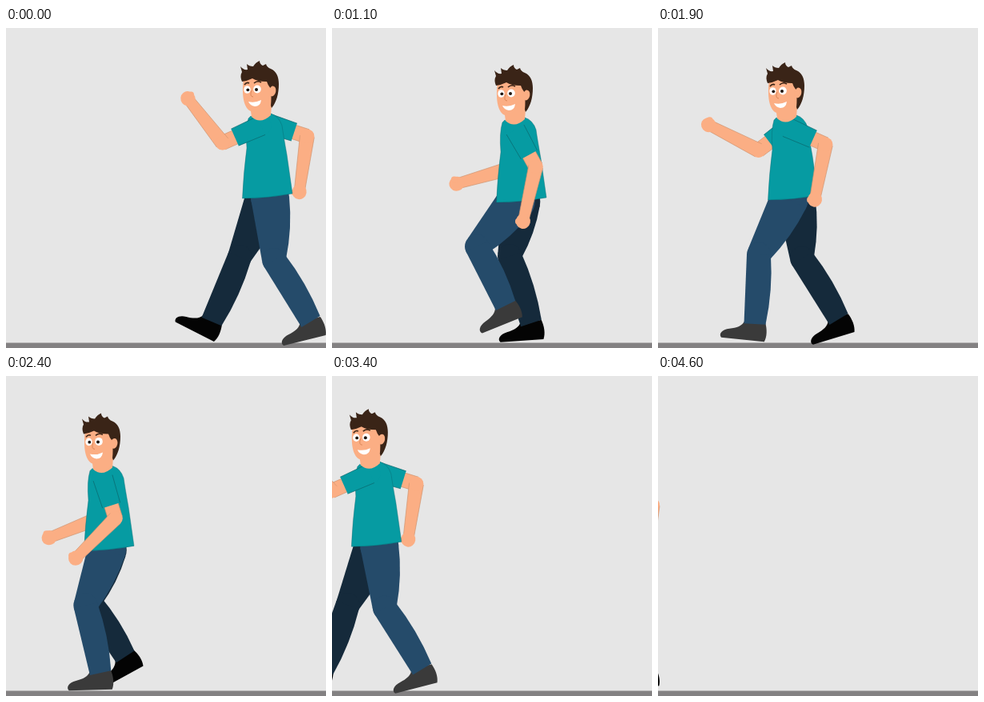
These frames come from a looping animation (400x400 px, 4.7 s). An HTML page with a canvas:

```html
<!DOCTYPE html>
<html lang="en">
<head>
<meta charset="utf-8">
<title>Walking man</title>
<style>
  html, body { margin: 0; width: 100%; height: 100%; overflow: hidden; background: #e6e6e6; }
  canvas { display: block; width: 400px; height: 400px; }
</style>
</head>
<body>
<canvas id="stage" width="400" height="400"></canvas>
<script>
const ctx = document.getElementById('stage').getContext('2d');

const LOOP = 4700, TICK = 100;
const CYCLE = 3330, STEP = CYCLE / 2, STEP_LENGTH = 132;
const UPPER = 53, FORE = 70, SLEEVE = 36;

const SKIN = '#fbae84', SKIN_EDGE = '#cf9470', HAIR = '#3a2417';
const SHIRT = '#069ba2', SEAM = '#0b666c';
const NEAR = { pants: '#254b6a', shoe: '#3a3a3a', shoulder: [319, 122] };
const FAR = { pants: '#152a3b', shoe: '#040404', shoulder: [326, 119] };

// time, x, y of the body, one step
const BODY = [
  [0, 0, 0], [235, -26, 2], [485, -48.5, 5], [1100, -90, 5], [1235, -98.5, 4]
];

// time, upper arm, forearm, knee x, y (in the body), ankle x, y (on the stage), shoe turn
const LIMBS = [
  [0, 66, 142, 335, 290, 381, 367, -14],
  [235, 53, 117, 338, 286, 358, 364, -17],
  [500, 33, 102, 323, 282, 321, 355, -29],
  [1100, -29, 13, 271, 268, 217, 347, -22],
  [1235, -45, 6, 275, 263, 194, 351, -7],
  [1665, -72, 8, 292, 286, 125, 367, 27],
  [1900, -66, 11, 284, 281, 121, 370, 6],
  [2165, -39, 28, 289, 282, 119, 372, 0],
  [2765, 14, 74, 312, 280, 117, 369, -4],
  [2900, 18, 94, 319, 283, 116, 369, -9]
];

const SHOE = new Path2D('M-13-3L13-3C16 5 17 14 14 21L-40 21C-44 17-40 11-31 9C-22 7-15 4-13-3Z');
const TORSO = new Path2D('M306 110Q319 122 331 107Q341 110 345 122Q347 136 351 158L358 207' +
  'Q327 213 295.5 213Q297 180 301 150Q299 126 303 113Z');
const FACE = new Path2D('M297 62C295 78 295 99 306 104L307 111Q318 121 331 109L332 97L339 78L336 62Z');
const HAIR_SHAPE = new Path2D('M295 67Q292 60 295 55L293 48Q297 53 302 52L301 45Q304 48 309 48' +
  'Q312 43 317 41Q317 45 321 47L325 45Q326 49 331 51C338 54 341 61 341 70' +
  'C341 82 338 93 332 100L331 97Q332 88 331 76Q327 71 326 67Q314 67 308 63Q302 66 295 67Z');
const SMILE = new Path2D('M303 92Q311 94 319 90Q318 98 311 98Q305 97 303 92Z');
const BROWS = new Path2D('M298 71Q301 67 304 69M310 69Q314 65 319 68');

// smooth periodic curve through the keys; drift is the gain per period
function sample(keys, period, t, col, drift = 0) {
  const n = keys.length;
  const lap = Math.floor(t / period), p = t - lap * period;
  const key = i => {
    const wrap = Math.floor(i / n), row = keys[i - wrap * n];
    return [row[0] + wrap * period, row[col] + wrap * drift];
  };
  let i = n - 1;
  while (keys[i][0] > p) i--;
  const [a, b, c, d] = [key(i - 1), key(i), key(i + 1), key(i + 2)];
  const span = c[0] - b[0], u = (p - b[0]) / span;
  const m0 = (c[1] - a[1]) / (c[0] - a[0]) * span;
  const m1 = (d[1] - b[1]) / (d[0] - b[0]) * span;
  const u2 = u * u, u3 = u2 * u;
  return (2 * u3 - 3 * u2 + 1) * b[1] + (u3 - 2 * u2 + u) * m0 +
    (3 * u2 - 2 * u3) * c[1] + (u3 - u2) * m1 + lap * drift;
}

function disc(x, y, rx, ry = rx, turn = 0) {
  ctx.beginPath();
  ctx.ellipse(x, y, rx, ry, turn, 0, 7);
  ctx.fill();
}

// tapered bone with a round start; bow swells the back edge, seam draws both long edges
function bone([ax, ay], [bx, by], ra, rb, fill, { bow = 0, seam } = {}) {
  const len = Math.hypot(bx - ax, by - ay) || 1;
  const nx = (ay - by) / len, ny = (bx - ax) / len;
  const side = s => {
    ctx.moveTo(ax + s * nx * ra, ay + s * ny * ra);
    ctx.lineTo(bx + s * nx * rb, by + s * ny * rb);
  };
  const mid = (ra + rb) / 2 + bow * 2;
  ctx.fillStyle = fill;
  disc(ax, ay, ra);
  ctx.beginPath();
  side(1);
  ctx.lineTo(bx - nx * rb, by - ny * rb);
  ctx.quadraticCurveTo((ax + bx) / 2 - nx * mid, (ay + by) / 2 - ny * mid, ax - nx * ra, ay - ny * ra);
  ctx.fill();
  if (!seam) return;
  ctx.beginPath();
  side(1);
  side(-1);
  ctx.strokeStyle = seam;
  ctx.lineWidth = 0.7;
  ctx.stroke();
}

const reach = ([x, y], deg, len) => {
  const a = deg * Math.PI / 180;
  return [x - Math.sin(a) * len, y + Math.cos(a) * len];
};

function pose(t, shift) {
  const at = (col, drift) => sample(LIMBS, CYCLE, t, col, drift);
  return {
    upper: at(1), fore: at(2), knee: [at(3), at(4)],
    ankle: [at(5, -2 * STEP_LENGTH) + shift, at(6)], turn: at(7)
  };
}

function drawLeg(p, look, [bx, by]) {
  const knee = [p.knee[0] + bx, p.knee[1] + by];
  const hip = [330 + (p.knee[0] - 335) * 0.16 + bx, 212 + by];
  ctx.save();
  ctx.translate(...p.ankle);
  ctx.rotate(p.turn * Math.PI / 180);
  ctx.fillStyle = look.shoe;
  ctx.fill(SHOE);
  ctx.restore();
  bone(hip, knee, 24, 15, look.pants, { bow: 3 });
  bone(knee, p.ankle, 15, 13.5, look.pants, { bow: 3 });
}

function drawArm(p, look) {
  const elbow = reach(look.shoulder, p.upper, UPPER);
  const hand = reach(elbow, p.fore, FORE);
  const cuff = reach(look.shoulder, p.upper, SLEEVE);
  const turn = p.fore * Math.PI / 180;
  bone(look.shoulder, elbow, 9, 9, SKIN, { seam: SKIN_EDGE });
  bone(elbow, hand, 9, 6.5, SKIN, { seam: SKIN_EDGE });
  ctx.fillStyle = SKIN;
  disc(...elbow, 8.6);
  disc(...hand, 9, 9.5, turn);
  disc(...reach(hand, p.fore + 75, 6), 4);
  bone(look.shoulder, cuff, 12.5, 11.5, SHIRT, { seam: SEAM });
}

function drawHead() {
  ctx.fillStyle = SKIN;
  ctx.fill(FACE);
  ctx.fillStyle = HAIR;
  ctx.fill(HAIR_SHAPE);
  ctx.fillStyle = SKIN;
  disc(333, 79, 4.3, 6.5, 0.2);
  ctx.fillStyle = '#fff';
  disc(301.5, 77, 4.2, 4.8);
  disc(314, 76.5, 4.8, 5);
  ctx.fill(SMILE);
  ctx.fillStyle = '#20160f';
  disc(302.3, 77.3, 1.9);
  disc(313, 77, 2);
  ctx.strokeStyle = HAIR;
  ctx.lineWidth = 1.6;
  ctx.stroke(BROWS);
  ctx.strokeStyle = '#d98455';
  ctx.lineWidth = 0.9;
  ctx.stroke(new Path2D('M307 78Q304 86 309 86'));
}

function draw(t) {
  ctx.fillStyle = '#e6e6e6';
  ctx.fillRect(0, 0, 400, 400);
  ctx.fillStyle = '#838182';
  ctx.fillRect(0, 393.5, 400, 6.5);

  const body = [sample(BODY, STEP, t, 1, -STEP_LENGTH), sample(BODY, STEP, t, 2)];
  const near = pose(t, 0), far = pose(t + STEP, STEP_LENGTH);
  const inBody = paint => {
    ctx.save();
    ctx.translate(...body);
    paint();
    ctx.restore();
  };

  inBody(() => drawArm(far, FAR));
  drawLeg(far, FAR, body);
  drawLeg(near, NEAR, body);
  inBody(() => {
    ctx.fillStyle = SHIRT;
    ctx.fill(TORSO);
    ctx.strokeStyle = SEAM;
    ctx.lineWidth = 0.4;
    ctx.stroke(TORSO);
    drawArm(near, NEAR);
    drawHead();
  });
}

function loop() {
  const t = performance.now() % LOOP;
  draw(Math.floor(t / TICK) * TICK);
  requestAnimationFrame(loop);
}
loop();
</script>
</body>
</html>
```
